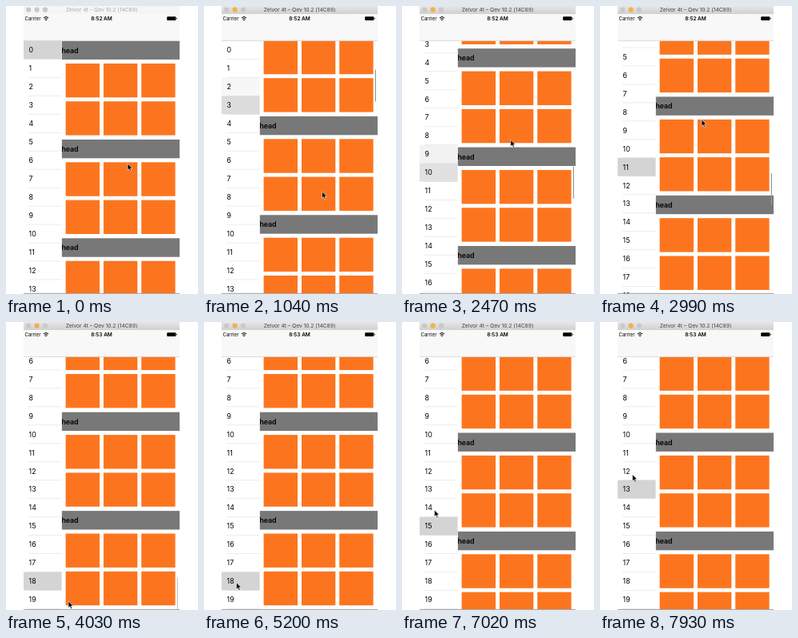
These frames come from a looping animation (240x360 px, 8 s). An HTML page:

```html
<!DOCTYPE html>
<html lang="en">
<head>
<meta charset="utf-8">
<title>Linked lists</title>
<style>
  html, body { margin: 0; width: 100%; height: 100%; overflow: hidden; background: #fff; }
  svg { display: block; width: 100vw; height: 100vh; }
  text { font-family: Inter, Roboto, sans-serif; }
</style>
</head>
<body>
<svg id="stage" viewBox="0 0 240 360">
  <defs>
    <linearGradient id="chrome" x2="0" y2="1">
      <stop offset="0" stop-color="#e6e6e6"/><stop offset="1" stop-color="#d0d0d0"/>
    </linearGradient>
    <clipPath id="view"><rect x="22" y="43.5" width="195" height="315.5"/></clipPath>
  </defs>
  <rect width="240" height="360" fill="#fff"/>
  <g clip-path="url(#view)">
    <g id="grid"></g>
    <g id="list"></g>
    <rect id="bar" x="213.8" width="1.2" height="40" rx=".6" fill="#999"/>
  </g>
  <rect x="22" y="10" width="195" height="33.5" fill="#f8f8f8"/>
  <path d="M22 43.4H217" stroke="#b8b8b8" stroke-width=".5"/>
  <path d="M22 359.4H217" stroke="#8a8a8a" stroke-width=".8"/>
  <rect id="titleBar" x="22" width="195" height="10"/>
  <g id="lights"></g>
  <text id="title" x="119.5" y="7.2" font-size="6.7" text-anchor="middle">Zelvor 4t – Qev 10.2 (14C89)</text>
  <text x="23.5" y="18" font-size="6.1">Carrier</text>
  <g fill="none" stroke="#000" stroke-width="1">
    <path d="M47 14.8Q50 12 53 14.8M48.2 16.3Q50 14.7 51.8 16.3"/>
    <circle cx="50" cy="17.6" r=".4"/>
  </g>
  <text id="clock" x="119.5" y="18" font-size="6.5" font-weight="600" text-anchor="middle"></text>
  <rect x="201.2" y="13.2" width="11.2" height="4.8" rx="1"/>
  <rect x="212.9" y="14.8" width=".9" height="1.7" rx=".4"/>
  <path id="cursor" d="M0 0V8.3L1.9 6.5L3.3 9.6L4.7 9L3.4 6H6Z" stroke="#fff" stroke-width=".6"/>
</svg>
<script>
const LOOP = 8000, TOP = 43.5, VIEW = 315.5, COUNT = 20;
const ROW = 22.96, HEAD = 23.4, SECTION = 123.4, CELL = 42.4, STEP = 47.3;
const MAX_GRID = 2152, MAX_LIST = 144.3;
const FIRST_TAP = 4700, TAP_GAP = 475, GLIDE = 300, FADE = 270;

// Each flick of the grid ends in one of these poses.
const poses = [
  { time: 130, scroll: 0, x: 152, y: 197 },
  { time: 1040, scroll: 274, x: 147.5, y: 232 },
  { time: 1680, scroll: 665, x: 148, y: 165 },
  { time: 1820, scroll: 590, x: 148, y: 203 },
  { time: 2990, scroll: 1285, x: 127, y: 142 },
  { time: 4030, scroll: MAX_GRID, x: 78, y: 349 },
  { time: FIRST_TAP, scroll: MAX_GRID, x: 40.5, y: 349 }
];

const byId = id => document.getElementById(id);
const clamp = (v, lo = 0, hi = 1) => Math.min(hi, Math.max(lo, v));
const mix = (a, b, p) => a + (b - a) * p;
const easeOut = p => 1 - (1 - p) ** 3;
const smooth = p => p * p * (3 - 2 * p);

function make(parent, tag, attrs, text = '') {
  const node = document.createElementNS('http://www.w3.org/2000/svg', tag);
  for (const key in attrs) node.setAttribute(key, attrs[key]);
  node.textContent = text;
  return parent.appendChild(node);
}

function poseValue(key, t, ease) {
  const next = poses.findIndex(pose => pose.time > t);
  if (next < 1) return poses[next < 0 ? poses.length - 1 : 0][key];
  const a = poses[next - 1], b = poses[next];
  return mix(a[key], b[key], ease((t - a.time) / (b.time - a.time)));
}

// Rows are tapped upwards from the last one at an even pace.
const tapCount = t => (t - FIRST_TAP) / TAP_GAP;
const tappedRow = t => COUNT - 1 - Math.floor(tapCount(t));
const sectionOffset = row => Math.min(MAX_GRID, row * SECTION + HEAD + 5);

function gridOffset(t) {
  if (t < FIRST_TAP) return poseValue('scroll', t, easeOut);
  const row = tappedRow(t), elapsed = tapCount(t) % 1 * TAP_GAP;
  return mix(sectionOffset(row + 1), sectionOffset(row), smooth(clamp(elapsed / GLIDE)));
}

function selectedAt(t) {
  if (t >= FIRST_TAP) return tappedRow(t);
  return Math.max(0, Math.floor((gridOffset(t) - HEAD) / SECTION) + 1);
}

const listTarget = row => clamp((row + .5) * ROW - VIEW / 2, 0, MAX_LIST);

function cursorY(t) {
  const taps = Math.max(0, tapCount(t));
  return poseValue('y', t, smooth) - ROW * (Math.floor(taps) + smooth(taps % 1));
}

const sections = Array.from({ length: COUNT }, () => {
  const group = make(byId('grid'), 'g', {});
  make(group, 'rect', { x: 69.6, width: 147.4, height: HEAD, fill: '#787878' });
  make(group, 'text', { x: 69.4, y: 15, 'font-size': 8.8, 'font-weight': 600 }, 'head');
  for (let i = 0; i < 6; i++) {
    make(group, 'rect', {
      x: 74.6 + i % 3 * STEP, y: HEAD + 5 + Math.floor(i / 3) * STEP,
      width: CELL, height: CELL, fill: '#fc751e'
    });
  }
  return group;
});

make(byId('list'), 'rect', { x: 22, y: -5, width: 47.6, height: COUNT * ROW + 10, fill: '#fff' });
const rowFills = Array.from({ length: COUNT }, (_, i) => {
  const y = i * ROW;
  const fill = make(byId('list'), 'rect', { x: 22, y, width: 47.6, height: ROW, fill: '#d4d4d4' });
  make(byId('list'), 'path', { d: `M28 ${y + ROW}H69.6`, stroke: '#d9d9d9', 'stroke-width': .5 });
  make(byId('list'), 'text', { x: 28.6, y: y + 14.8, 'font-size': 8.8 }, i);
  return fill;
});

const lights = [0, 1, 2].map(i =>
  make(byId('lights'), 'circle', { cx: 28.2 + i * 10.4, cy: 4.7, r: 3.1, fill: '#c9c9c9' }));

function render(t) {
  const offset = gridOffset(t);
  sections.forEach((group, i) =>
    group.setAttribute('transform', `translate(0 ${TOP + i * SECTION - offset})`));

  // Averaging the recent selections fades the highlight and eases the list.
  const span = t < FIRST_TAP ? FADE : 0, samples = 27;
  const weights = new Array(COUNT).fill(0);
  let listOffset = 0;
  for (let i = 0; i < samples; i++) {
    const row = selectedAt(t - span * i / samples);
    weights[row] += 1 / samples;
    listOffset += listTarget(row) / samples;
  }
  rowFills.forEach((fill, i) => fill.setAttribute('opacity', weights[i]));
  byId('list').setAttribute('transform', `translate(0 ${TOP - listOffset})`);

  byId('bar').setAttribute('y', TOP + .8 + offset / (COUNT * SECTION) * VIEW);
  byId('bar').setAttribute('opacity', Math.min(clamp((t - 130) / 70), clamp((4160 - t) / 240)));

  const active = t >= poses[0].time;
  byId('titleBar').setAttribute('fill', active ? 'url(#chrome)' : '#f5f5f5');
  byId('title').setAttribute('fill', active ? '#444' : '#aaa');
  lights[1].setAttribute('fill', active ? '#f0b24a' : '#c9c9c9');
  byId('clock').textContent = t < 3500 ? '8:52 AM' : '8:53 AM';
  byId('cursor').setAttribute('transform', `translate(${poseValue('x', t, smooth)} ${cursorY(t)})`);
}

function tick() {
  render(performance.now() % LOOP);
  requestAnimationFrame(tick);
}
tick();
</script>
</body>
</html>
```
